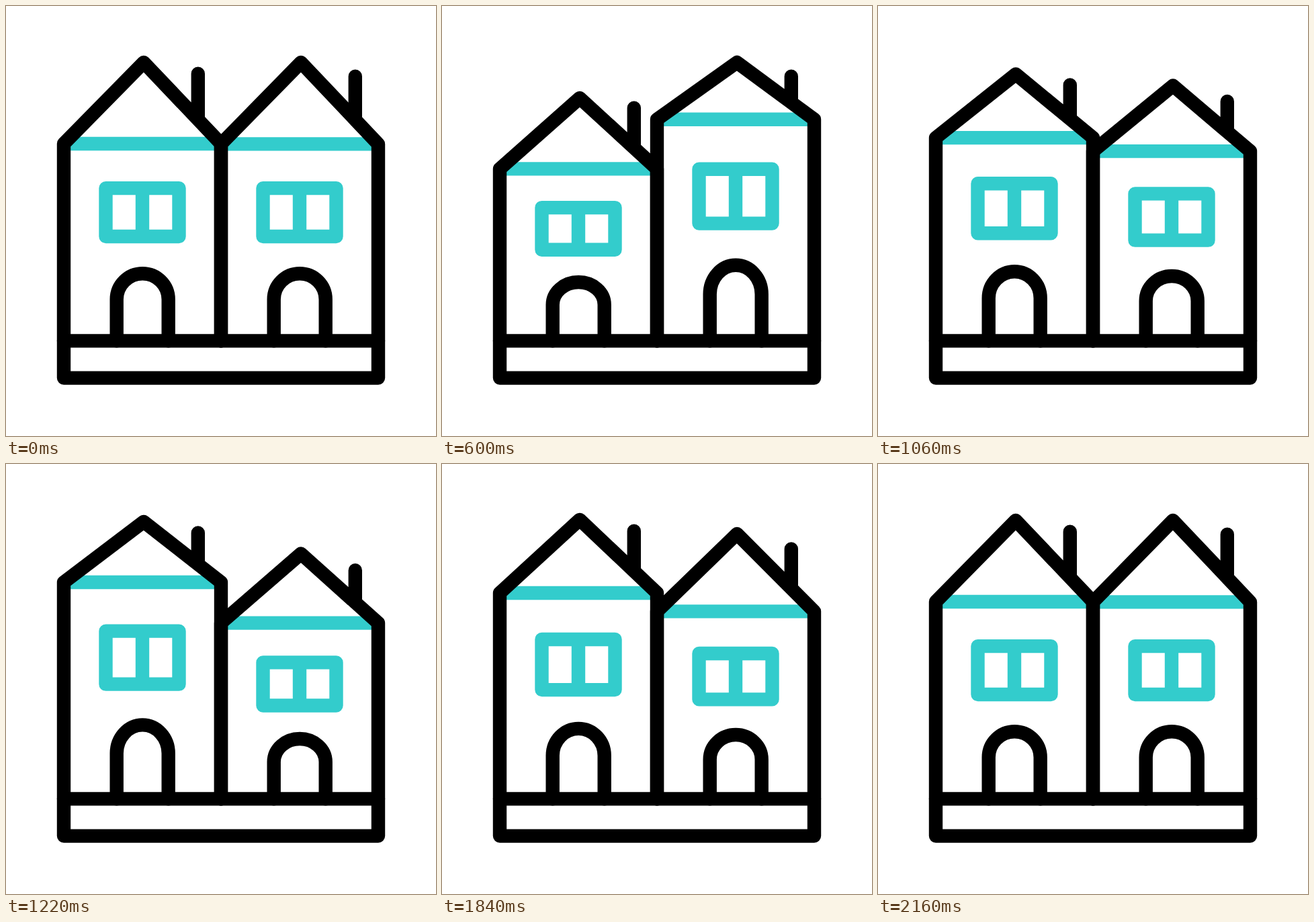
Write an HTML page that moves like this. It is 640 by 640 pixels and loops after 2.4 s.

```html
<!DOCTYPE html>
<html lang="en">
<head>
<meta charset="utf-8">
<title>Two houses</title>
<style>
  html, body { margin: 0; width: 100%; height: 100%; overflow: hidden; background: #fff; }
  svg { display: block; width: 100vw; height: 100vh; }
  path { fill: none; stroke: #000; stroke-width: 20.4; stroke-linecap: round; stroke-linejoin: round; }
  .accent { stroke: #3cc; }
  .band { stroke-linecap: butt; }
</style>
</head>
<body>
<svg viewBox="0 0 640 640"></svg>
<script>
const LOOP = 2400;
const STEP = 20;
const GROUND = 498.4;
const svg = document.querySelector('svg');

// Poses per house: [height scale, apex y, chimney top y]
const houses = [
  { x: 86, eave: 293.4, poses: [[1, 84, 100.8], [0.8725, 137, 151.6], [1.1215, 80.8, 97.6]] },
  { x: 320, eave: 293, poses: [[1, 84, 104.8], [1.125, 84, 104.8], [0.87, 138.5, 163.6]] }
];

// Moves: [start ms, duration ms, from pose, to pose]
const moves = [[0, 600, 0, 1], [820, 560, 1, 2], [1600, 560, 2, 0]];

function addPath(className) {
  const path = document.createElementNS('http://www.w3.org/2000/svg', 'path');
  path.setAttribute('class', className);
  svg.append(path);
  return path;
}

function bezier(a, b, s) {
  const r = 1 - s;
  return 3 * r * r * s * a + 3 * r * s * s * b + s * s * s;
}

function ease(x) {
  let low = 0, high = 1;
  for (let i = 0; i < 30; i++) {
    const mid = (low + high) / 2;
    if (bezier(0.167, 0.5, mid) < x) low = mid;
    else high = mid;
  }
  return bezier(0.167, 1, low);
}

for (const house of houses) {
  house.band = addPath('accent band');
  house.window = addPath('accent');
}
for (const house of houses) house.outline = addPath('');
addPath('').setAttribute('d', `M86 ${GROUND}H554V553.6H86Z`);

function drawHouse({ x, eave, band, window, outline }, [scale, apex, chimney]) {
  const up = height => GROUND - height * scale;
  const top = up(eave);
  const right = x + 234, peak = x + 119, stack = x + 199.8;
  const roof = top - (top - apex) * (right - stack) / (right - peak);
  const doorLeft = x + 78.7, doorRight = x + 155.7;

  band.setAttribute('d', `M${x + 6} ${top}H${right - 6}`);
  window.setAttribute('d',
    `M${x + 62.5} ${up(227.3)}H${x + 171.5}V${up(155.4)}H${x + 62.5}Z` +
    `M${x + 117} ${up(227.3)}V${up(155.4)}`);
  outline.setAttribute('d',
    `M${x} ${GROUND}V${top}L${peak} ${apex}L${right} ${top}V${GROUND}` +
    `M${stack} ${chimney}V${roof}` +
    `M${doorLeft} ${GROUND}V${up(61.6)}` +
    `A38.5 ${38.5 * scale} 0 0 1 ${doorRight} ${up(61.6)}V${GROUND}`);
}

function draw(time) {
  const [start, length, from, to] = moves.findLast(move => move[0] <= time);
  const k = ease(Math.min(1, (time - start) / length));
  for (const house of houses) {
    const a = house.poses[from], b = house.poses[to];
    drawHouse(house, a.map((value, i) => value + (b[i] - value) * k));
  }
}

const begin = performance.now();
function tick() {
  const time = (performance.now() - begin) % LOOP;
  draw(Math.floor(time / STEP) * STEP);
  requestAnimationFrame(tick);
}
tick();
</script>
</body>
</html>
```
